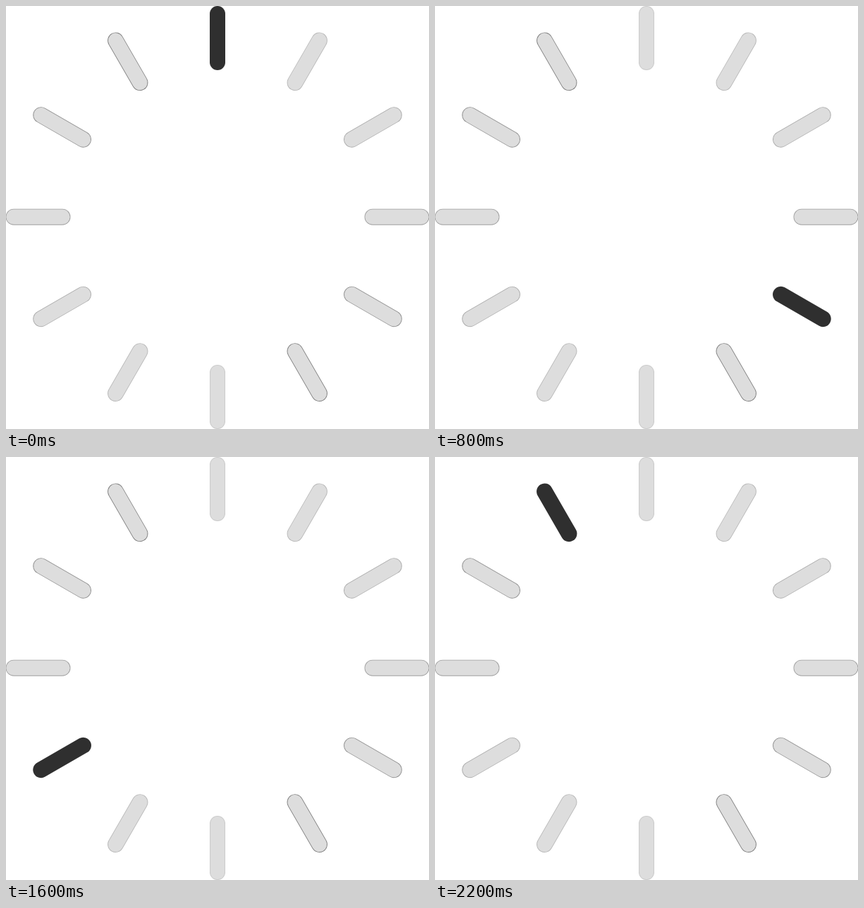
An HTML page with a canvas that plays this animation: 600 px wide and 600 px high, repeating every 2.4 s.

```html
<!DOCTYPE html>
<html lang="en">
<head>
<meta charset="utf-8">
<title>Loading</title>
<style>
  html, body { margin: 0; width: 100%; height: 100%; overflow: hidden; background: #fff; }
  canvas { display: block; width: 600px; height: 600px; }
</style>
</head>
<body>
<canvas id="stage" width="600" height="600"></canvas>
<script>
const ctx = document.getElementById('stage').getContext('2d');
const COUNT = 12;
const STEP = 200;
const INNER = 220;
const OUTER = 289;

function line(angle, cy, width, color) {
  const dx = Math.sin(angle), dy = -Math.cos(angle);
  ctx.lineWidth = width;
  ctx.strokeStyle = color;
  ctx.beginPath();
  ctx.moveTo(300 + dx * INNER, cy + dy * INNER);
  ctx.lineTo(300 + dx * OUTER, cy + dy * OUTER);
  ctx.stroke();
}

function bar(i, active) {
  const angle = i * 2 * Math.PI / COUNT;
  const upright = i % 6 === 0;
  const cy = upright ? 300 : 299.2;
  const width = upright ? 22 : 22.9;
  if (active) {
    line(angle, cy, width, '#2f2f2f');
  } else {
    // The rim darkens clockwise over each half turn.
    const rim = 200 - 14 * (i % 6);
    line(angle, cy, width, `rgb(${rim}, ${rim}, ${rim})`);
    line(angle, cy, width - 1.7, '#ddd');
  }
}

function draw(time) {
  const current = Math.floor(time / STEP) % COUNT;
  ctx.fillStyle = '#fff';
  ctx.fillRect(0, 0, 600, 600);
  ctx.lineCap = 'round';
  for (let i = 0; i < COUNT; i++) bar(i, i === current);
}

const start = performance.now();
function tick() {
  draw(performance.now() - start);
  requestAnimationFrame(tick);
}
tick();
</script>
</body>
</html>
```
